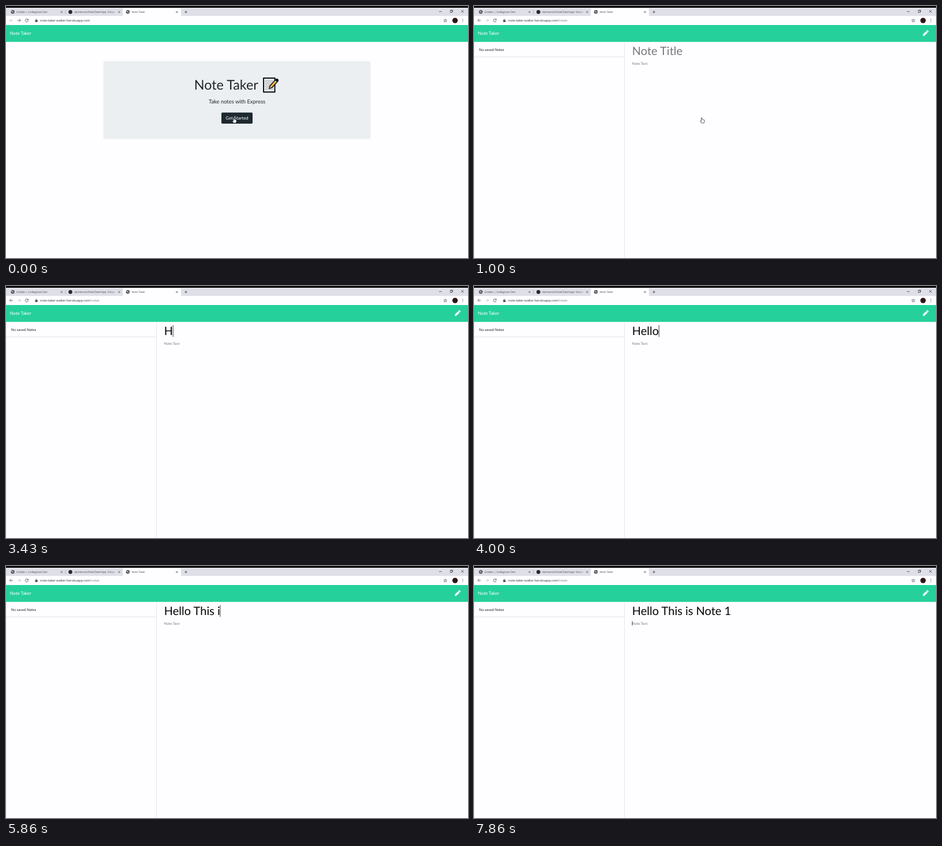
These frames come from a looping animation (800x437 px, 8000 ms). An HTML page with a canvas:

```html
<!DOCTYPE html>
<html lang="en">
<head>
<meta charset="utf-8">
<title>Note Taker</title>
<style>
html, body { margin: 0; width: 100%; height: 100%; overflow: hidden; background: #fefdff; }
canvas { display: block; width: 800px; height: 437px; }
</style>
</head>
<body>
<canvas id="stage"></canvas>
<script>
const W = 800, H = 437, LOOP = 8000, FPS = 7;
const canvas = document.getElementById('stage');
const dpr = window.devicePixelRatio || 1;
canvas.width = W * dpr;
canvas.height = H * dpr;
const c = canvas.getContext('2d');

const LATO = 'Lato, sans-serif';
const UI = '"Open Sans", "Noto Sans", sans-serif';
const PAPER = '#fefdff', INK = '#212529', ICON = '#4c4e53', PALE = '#babbc0';
const HOST = 'note-taker-walter.herokuapp.com';
const TITLE = 'Hello This is Note 1';

// Steps (1/7 s each) at which things happen
const CLICK = 3, COMMIT = 6, LOADED = 7, FOCUS = 18, TAB_KEY = 55;
const KEYS = [24, 25, 26, 27, 28, 30, 34, 35, 37, 38, 39, 41, 42, 44, 46, 48, 49, 50, 51, 52];
const PATH = [[7, 395, 197], [8, 390, 180], [9, 374, 150], [10, 360, 132], [12, 348, 126],
  [14, 344, 140], [15, 340, 148], [16, 333, 125], [17, 322, 98], [18, 315, 81], [24, 315, 81]];

function rect(x, y, w, h, color, r = 0) {
  c.fillStyle = color;
  c.beginPath();
  c.roundRect(x, y, w, h, r);
  c.fill();
}

function disc(x, y, r, color) {
  c.fillStyle = color;
  c.beginPath();
  c.arc(x, y, r, 0, 7);
  c.fill();
}

function line(points, color, width = 0.8) {
  c.strokeStyle = color;
  c.lineWidth = width;
  c.beginPath();
  points.forEach(([x, y]) => c.lineTo(x, y));
  c.stroke();
}

function arc(x, y, r, from, to, color, width = 0.8) {
  c.strokeStyle = color;
  c.lineWidth = width;
  c.beginPath();
  c.arc(x, y, r, from, to);
  c.stroke();
}

function poly(points, fill) {
  c.fillStyle = fill;
  c.beginPath();
  points.forEach(([x, y]) => c.lineTo(x, y));
  c.closePath();
  c.fill();
}

function text(str, x, y, size, color, family = LATO, align = 'left') {
  c.font = `${size}px ${family}`;
  c.textAlign = align;
  c.fillStyle = color;
  c.fillText(str, x, y);
}

function cross(x, y, r, color = ICON, width = 0.8) {
  line([[x - r, y - r], [x + r, y + r]], color, width);
  line([[x + r, y - r], [x - r, y + r]], color, width);
}

function globe(x, y) {
  disc(x, y, 3.2, '#55575c');
  poly([[x - 2, y - 1], [x - 0.5, y - 1.8], [x + 0.4, y - 0.4], [x - 0.7, y + 0.6]], '#e3e3ea');
  poly([[x + 0.4, y + 0.5], [x + 2, y], [x + 1.2, y + 2]], '#e3e3ea');
}

function tabTitle(str, x, end) {
  const fade = c.createLinearGradient(end - 9, 0, end, 0);
  fade.addColorStop(0, '#45474c');
  fade.addColorStop(1, 'rgba(69,71,76,0)');
  text(str, x, 12.2, 4.7, fade, UI);
}

function arrow(x, dir, color) {
  const y = 25;
  line([[x - 2.7, y], [x + 2.7, y]], color);
  line([[x + dir * 0.1, y - 2.6], [x + dir * 2.7, y], [x + dir * 0.1, y + 2.6]], color);
}

function star(x, y) {
  c.beginPath();
  for (let i = 0; i < 10; i++) {
    const a = i * Math.PI / 5 - Math.PI / 2, r = i % 2 ? 1.3 : 3;
    c.lineTo(x + r * Math.cos(a), y + r * Math.sin(a));
  }
  c.closePath();
  c.strokeStyle = ICON;
  c.lineWidth = 0.7;
  c.stroke();
}

function drawTabs(k) {
  rect(0, 0, W, 17.5, '#dedfe7');
  rect(0, 0, W, 3, '#000');
  rect(202, 4, 101, 14, PAPER, [3, 3, 0, 0]);
  globe(11.7, 10.3);
  tabTitle('Grades | Codegrove Den', 18, 92);
  line([[103, 6.5], [103, 14]], '#9a9ca3', 0.6);
  disc(111.5, 10.4, 3.3, '#24292e');
  tabTitle('dalmevost/NoteTakerApp: Simple', 118, 191);

  if (k < CLICK || k >= LOADED) {
    globe(211, 10.3);
  } else if (k < COMMIT) {
    const a = -Math.PI / 2 - (k - CLICK) * 1.1;
    arc(211, 10.3, 2.8, a - 1.8, a, '#85878d');
  } else {
    arc(211, 10.3, 2.8, -1.75, -1.4, '#4a7fd8');
  }
  tabTitle(k === COMMIT ? `https://${HOST}` : 'Note Taker', 217.5, 291);

  [96.3, 196, 296].forEach(x => cross(x, 10.4, 1.6));
  line([[309, 10.4], [314, 10.4]], ICON);
  line([[311.5, 7.9], [311.5, 12.9]], ICON);

  line([[750, 9.7], [754.3, 9.7]], '#222', 0.7);
  c.strokeStyle = '#222';
  c.lineWidth = 0.6;
  c.strokeRect(769.2, 8, 3.2, 3.2);
  line([[770.2, 8], [770.2, 7], [773.4, 7], [773.4, 10.2], [772.4, 10.2]], '#222', 0.6);
  cross(790.4, 9.3, 2.1, '#222', 0.7);
}

function drawToolbar(k) {
  const gone = k >= COMMIT;
  rect(0, 17.3, W, 15.7, PAPER);
  arrow(9.2, -1, gone ? ICON : PALE);
  arrow(22.6, 1, gone ? PALE : ICON);
  if (k >= CLICK && k < LOADED) {
    cross(36, 25, 2.3);
  } else {
    arc(36, 25, 2.6, 0.3, 5.5, ICON);
    poly([[38.9, 21.9], [38.9, 24.6], [36.2, 24.6]], ICON);
  }

  rect(50.5, 24.2, 4.2, 3.5, ICON, 0.4);
  arc(52.6, 24.1, 1.2, Math.PI, 0, ICON, 0.7);
  text(HOST, 59, 27, 5.5, '#303136', UI);
  if (gone) text('/notes', 59 + c.measureText(HOST).width, 27, 5.5, '#797b80', UI);

  star(760.6, 25.3);
  disc(777.6, 25.1, 4.7, '#2b1613');
  [22.9, 25.1, 27.3].forEach(y => disc(791, y, 0.6, ICON));
}

function pencil() {
  c.save();
  c.translate(782, 47.2);
  c.rotate(-Math.PI / 4);
  poly([[-7, 0], [-4, -1.9], [2.4, -1.9], [2.4, 1.9], [-4, 1.9]], '#fff');
  rect(3.1, -1.9, 3, 3.8, '#fff', [0, 0.9, 0.9, 0]);
  c.restore();
}

function memo() {
  rect(445, 124, 21.5, 26.2, '#111', 0.8);
  rect(447, 126, 17.5, 22.2, '#e9eaeb');
  for (let y = 129; y < 146; y += 2.6) line([[448.5, y], [462.5, y]], '#8f9396', 0.7);
  c.save();
  c.translate(456, 143);
  c.rotate(-0.83);
  poly([[-1.5, 0], [4, -3.1], [20, -3.1], [22, -1.5], [22, 1.5], [20, 3.1], [4, 3.1]], '#111');
  poly([[1, 0], [4.8, -1.6], [4.8, 1.6]], '#f3d3a2');
  rect(4.8, -1.6, 10.6, 3.2, '#f5b941');
  rect(15.4, -1.6, 1.7, 3.2, '#d5d6d8');
  c.restore();
}

function drawHome(k) {
  rect(168.6, 95.7, 462.6, 134.8, '#ebeff2', 1.8);
  text('Note Taker', 325.8, 144.8, 23.33, INK);
  memo();
  text('Take notes with Express', 400, 169.2, 9.375, INK, LATO, 'center');
  if (k >= CLICK) rect(371.7, 183.4, 56.6, 21.8, '#929aa1', 2.6);
  rect(373, 184.7, 54, 19.2, '#1e2931', 1.7);
  text('Get Started', 400, 197.1, 7.81, '#fff', LATO, 'center');
}

function caret(x, top, bottom) {
  line([[x, top], [x, bottom]], '#111', 0.8);
}

function drawNotes(k) {
  pencil();
  line([[0.3, 62], [0.3, H]], '#e3e4e8', 0.6);
  line([[260.5, 62], [260.5, H]], '#e3e4e8', 0.8);
  line([[0, 88.2], [260.5, 88.2]], '#dedfe3', 0.8);
  text('No saved Notes', 8.8, 77.5, 6.25, INK);
  text('Note Text', 273.8, 101.6, 6.25, '#77797c');

  const typed = TITLE.slice(0, KEYS.filter(at => at <= k).length);
  text(typed || 'Note Title', 273.8, 85.2, 20, typed ? '#050505' : '#77797c');
  if (k >= TAB_KEY) caret(274.1, 95.8, 103);
  else if (k >= FOCUS && k !== 21) {
    caret(274 + (typed ? c.measureText(typed).width : 0), 67.8, 88.3);
  }
}

function hand(x, y) {
  c.save();
  c.translate(x, y);
  c.beginPath();
  c.moveTo(-1.7, 2);
  c.lineTo(-1.7, -3.3);
  c.quadraticCurveTo(-0.9, -4.7, -0.1, -3.3);
  c.lineTo(-0.1, -0.7);
  c.quadraticCurveTo(1, -1.2, 1.5, -0.3);
  c.quadraticCurveTo(2.6, -0.6, 2.8, 0.2);
  c.quadraticCurveTo(3.9, 0.1, 3.9, 1.1);
  c.lineTo(3.7, 3.4);
  c.lineTo(2.8, 5.4);
  c.lineTo(-1.2, 5.4);
  c.lineTo(-3.6, 2.2);
  c.quadraticCurveTo(-3.6, 0.9, -1.7, 2);
  c.closePath();
  c.fillStyle = '#fff';
  c.fill();
  c.strokeStyle = '#15181b';
  c.lineWidth = 0.7;
  c.stroke();
  c.restore();
}

function beam(x, y) {
  line([[x, y - 3.7], [x, y + 3.7]], '#222', 0.7);
  [-3.7, 3.7].forEach(d => line([[x - 1.5, y + d], [x + 1.5, y + d]], '#222', 0.6));
}

function drawPointer(k) {
  if (k <= LOADED) return hand(395.3, 197.5);
  if (k >= KEYS[0]) return;
  const i = PATH.findIndex(p => p[0] > k);
  const [k0, x0, y0] = PATH[i - 1], [k1, x1, y1] = PATH[i];
  const u = (k - k0) / (k1 - k0);
  beam(x0 + (x1 - x0) * u, y0 + (y1 - y0) * u);
}

function draw(ms) {
  const k = Math.floor(ms * FPS / 1000 + 0.03);
  c.setTransform(dpr, 0, 0, dpr, 0, 0);
  c.textRendering = 'geometricPrecision';
  rect(0, 0, W, H, PAPER);
  drawTabs(k);
  drawToolbar(k);
  rect(0, 33, W, 29.2, '#25d09b');
  text('Note Taker', 6.7, 50.3, 7.81, '#fff');
  if (k < LOADED) drawHome(k);
  else drawNotes(k);
  drawPointer(k);
}

const start = performance.now();
function tick() {
  draw((performance.now() - start) % LOOP);
  requestAnimationFrame(tick);
}
tick();
</script>
</body>
</html>
```
